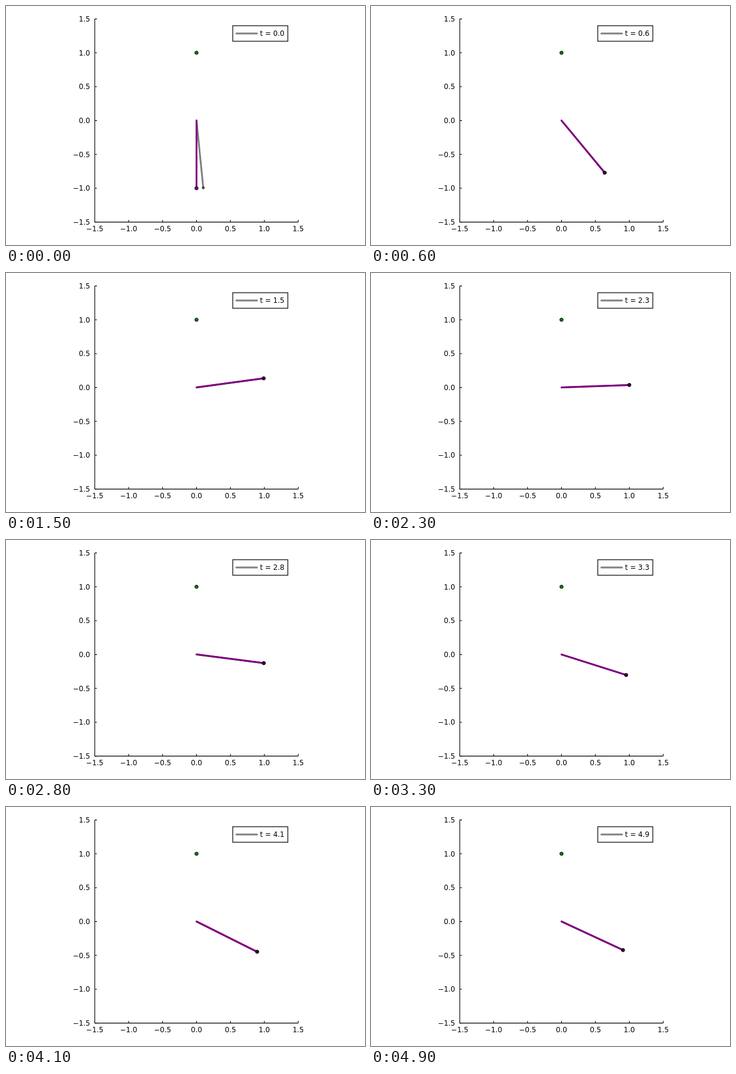
These frames come from a looping animation (600 by 400 pixels, 5000 ms). An HTML page:

```html
<!DOCTYPE html>
<html lang="en">
<head>
<meta charset="utf-8">
<title>Pendulum with state estimate</title>
<style>
  html, body { margin: 0; width: 100%; height: 100%; overflow: hidden; background: #fff; }
  svg { display: block; width: 600px; height: 400px; }
  text { font: 11.8px "DejaVu Sans", sans-serif; fill: #000; }
  .axis { fill: none; stroke: #000; stroke-width: 1.1; }
  .rod { stroke-width: 3; stroke-linecap: round; }
</style>
</head>
<body>
<svg viewBox="0 0 600 400">
  <g id="axes"></g>
  <line id="trueRod" class="rod" stroke="#808080"/>
  <line id="guessRod" class="rod" stroke="#800080"/>
  <circle id="goal" r="2.8" fill="#008000" stroke="#000"/>
  <circle id="guessBob" r="2.8" fill="#800080" stroke="#000"/>
  <circle id="trueBob" r="2" fill="#000" fill-opacity=".5" stroke="#000" stroke-opacity=".5"/>
  <rect x="379" y="33" width="92" height="26" fill="#fff" stroke="#000" stroke-width="1.2"/>
  <line class="rod" x1="385" y1="46" x2="419.5" y2="46" stroke="#808080"/>
  <text id="clock" x="424.6" y="50.3"></text>
</svg>
<script>
  const NS = "http://www.w3.org/2000/svg";
  const UNIT = 113.33, CX = 318.4, CY = 191.6;
  const LOOP = 5000, STEP = 100;
  const byId = id => document.getElementById(id);
  const px = x => CX + x * UNIT;
  const py = y => CY - y * UNIT;

  function set(el, attrs) {
    for (const key in attrs) el.setAttribute(key, attrs[key]);
    return el;
  }

  function add(tag, attrs, label) {
    const el = set(document.createElementNS(NS, tag), attrs);
    if (label) el.textContent = label;
    byId("axes").appendChild(el);
  }

  function drawAxes() {
    const left = px(-1.5), bottom = py(-1.5);
    add("path", { class: "axis", d: `M${left} ${py(1.5)}V${bottom}H${px(1.5)}` });
    for (let i = -3; i <= 3; i++) {
      const v = i / 2, x = px(v), y = py(v);
      const label = v.toFixed(1).replace("-", "\u2212");
      add("path", { class: "axis", d: `M${left} ${y}h3.6M${x} ${bottom}v-3.6` });
      add("text", { x: 140.6, y: y + 4.3, "text-anchor": "end" }, label);
      add("text", { x, y: 377.4, "text-anchor": "middle" }, label);
    }
  }

  // Swing angle from straight down: [time, angle, angular speed].
  const swing = [
    [0, 0.1, 0], [0.6, 0.691, 1.93], [1.2, 1.582, 0.88], [1.5, 1.706, 0.12],
    [2.3, 1.608, -0.28], [3, 1.37, -0.36], [3.3, 1.263, -0.32],
    [3.6, 1.183, -0.225], [4.1, 1.107, -0.06], [4.9, 1.135, 0.09]
  ];

  // Cubic Hermite interpolation between the swing states.
  function angleAt(t) {
    let i = 0;
    while (i < swing.length - 2 && t > swing[i + 1][0]) i++;
    const [t0, a0, v0] = swing[i], [t1, a1, v1] = swing[i + 1];
    const h = t1 - t0, s = (t - t0) / h, r = 1 - s;
    return r * r * ((1 + 2 * s) * a0 + s * h * v0)
         + s * s * ((3 - 2 * s) * a1 - r * h * v1);
  }

  function pose(name, angle) {
    const x = px(Math.sin(angle)), y = py(-Math.cos(angle));
    set(byId(name + "Rod"), { x1: CX, y1: CY, x2: x, y2: y });
    set(byId(name + "Bob"), { cx: x, cy: y });
  }

  function render(ms) {
    const t = Math.floor((ms % LOOP) / STEP) / 10;
    const angle = angleAt(t);
    pose("true", angle);
    pose("guess", angle - 0.1 * Math.exp(-8 * t));
    byId("clock").textContent = "t = " + t.toFixed(1);
  }

  drawAxes();
  set(byId("goal"), { cx: px(0), cy: py(1) });
  const start = performance.now();
  function tick() {
    render(performance.now() - start);
    requestAnimationFrame(tick);
  }
  tick();
</script>
</body>
</html>
```
